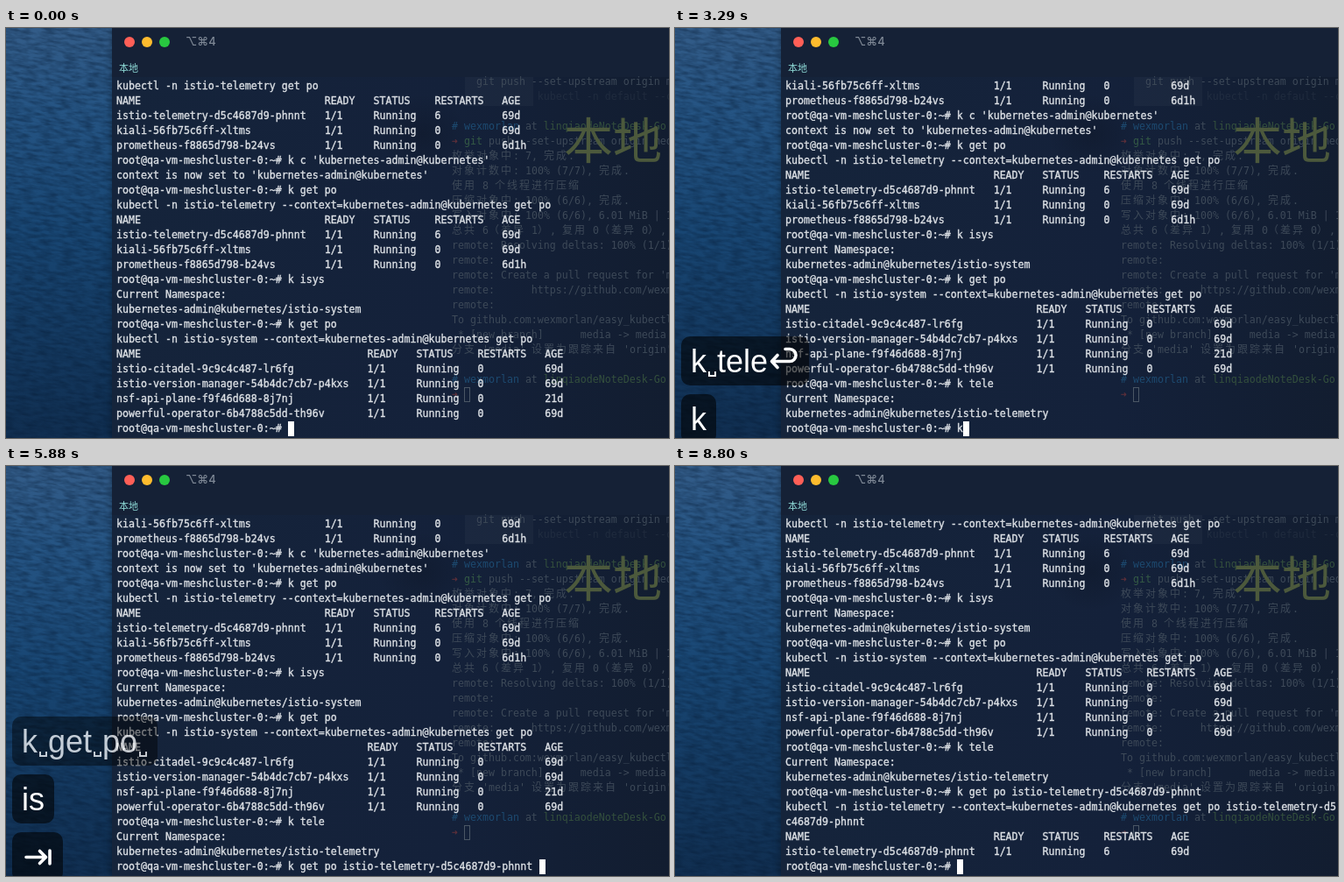
These frames come from a looping animation (757x468 px, 9760 ms). An HTML page:

```html
<!DOCTYPE html>
<html lang="en">
<head>
<meta charset="utf-8">
<title>Terminal session</title>
<style>
  html, body { margin: 0; width: 100%; height: 100%; overflow: hidden; background: #10304f; }
  #stage { position: relative; width: 757px; height: 468px; overflow: hidden; }
  #stage > *, #win > *, .key { position: absolute; }
  #win { left: 121px; top: 0; width: 636px; height: 468px; overflow: hidden;
    background: #152136; box-shadow: 0 0 8px rgba(0, 0, 0, .35); }
  #body { left: 0; top: 56px; width: 636px; height: 412px;
    background:
      radial-gradient(ellipse 50px 45px at 355px 65px, rgba(8, 13, 22, .25), transparent),
      linear-gradient(90deg, #15243b, #14213a 60%, #121d30); }
  .light { top: 10px; width: 12px; height: 12px; border-radius: 50%; }
  #title { left: 84px; top: 7px; color: #7f8996; font: 500 13px/17px Inter, "DejaVu Sans", sans-serif; }
  #tab { left: 8px; top: 37px; color: #8fdcd8; font: 11px/16px "Noto Sans CJK SC", "Noto Sans CJK", sans-serif; }
  #badge { left: 516px; top: 91px; color: #4c593c; white-space: nowrap;
    font: 500 56px/68px "Noto Sans CJK SC", "Noto Sans CJK", sans-serif; }
  #pane { left: 403px; top: 56px; width: 78px; height: 33px; background: rgba(255, 255, 255, .03); }
  #ghost, #term { margin: 0; white-space: pre;
    font: 11.627px/17px "DejaVu Sans Mono", "Noto Sans CJK SC", "Noto Sans CJK", monospace; }
  #ghost { left: 388px; top: 53px; color: #3d4958; }
  #ghost div { height: 17px; }
  #ghost i { font-style: normal; }
  .wide { font-size: 12px; letter-spacing: 2px; }
  .user { color: #1d4a70; } .host { color: #34503d; } .git { color: #345a45; }
  .mark { color: #5e303a; display: inline-block; width: 7px; }
  .faint { opacity: .3; }
  .box { display: inline-block; box-sizing: border-box; width: 7px; height: 17px;
    border: 1px solid #4a5664; vertical-align: top; }
  #term { left: 5px; top: 58px; color: #dde1e6; -webkit-text-stroke: .35px #dde1e6; }
  #cursor { top: 449px; width: 7px; height: 17px; background: #fff; }
  .key { left: 7px; height: 54px; padding: 2px 11px 0; border-radius: 10px; white-space: nowrap;
    background: rgba(0, 0, 0, .58); color: #fff;
    font: 36px/54px "Liberation Sans", Arial, sans-serif; }
  .key u { display: inline-block; box-sizing: border-box; width: 9px; height: 6px; margin: 0 1.5px;
    border: 2px solid #fff; border-top: 0; vertical-align: -5px; }
  .key svg { width: 36px; height: 54px; vertical-align: top; fill: none; stroke: #fff;
    stroke-width: 3.6; stroke-linecap: round; stroke-linejoin: round; }
</style>
</head>
<body>
<div id="stage">
  <svg width="757" height="468" style="left:0;top:0">
    <defs>
      <linearGradient id="sea" x2="0" y2="1">
        <stop offset="0" stop-color="#335c88"/>
        <stop offset=".2" stop-color="#255483"/>
        <stop offset=".5" stop-color="#184673"/>
        <stop offset="1" stop-color="#102e50"/>
      </linearGradient>
      <filter id="waves" x="0" y="0" width="1" height="1" color-interpolation-filters="sRGB">
        <feTurbulence type="fractalNoise" baseFrequency=".07 .28" numOctaves="3" seed="8"/>
        <feColorMatrix values="0 0 0 0 .02  0 0 0 0 .1  0 0 0 0 .2  .9 0 0 0 -.3"/>
      </filter>
    </defs>
    <rect width="130" height="468" fill="url(#sea)"/>
    <g transform="rotate(8)"><rect y="-30" width="220" height="520" filter="url(#waves)"/></g>
  </svg>
  <div id="win">
    <div id="body"></div>
    <div class="light" style="left:14px;background:#ff5f57"></div>
    <div class="light" style="left:34px;background:#febc2e"></div>
    <div class="light" style="left:54px;background:#28c840"></div>
    <div id="title">⌥⌘4</div>
    <div id="tab">本地</div>
    <div id="pane"></div>
    <div id="ghost"></div>
    <div id="badge">本地</div>
    <div id="term"></div>
    <div id="cursor"></div>
  </div>
  <div id="keys" style="left:0;top:0"></div>
</div>
<script>
const LOOP = 9760, ROWS = 24, CELL = 7;
const $ = id => document.getElementById(id);

// Dimmed window behind the terminal
const who = '<i class="user"># wexmorlan</i> at <i class="host">linqiaodeNoteDesk-Go</i>';
const ghost = [
  '    git push --set-upstream origin media',
  '<i class="faint">              kubectl -n default --context</i>', '',
  who,
  '<i class="mark">➜</i> <i class="git">git</i> push --set-upstream origin media',
  '枚举对象中: 7, 完成.',
  '对象计数中: 100% (7/7), 完成.',
  '使用 8 个线程进行压缩',
  '压缩对象中: 100% (6/6), 完成.',
  '写入对象中: 100% (6/6), 6.01 MiB | 1.20 MiB/s',
  '总共 6（差异 1）, 复用 0（差异 0）,',
  'remote: Resolving deltas: 100% (1/1)',
  'remote:',
  "remote: Create a pull request for 'media'",
  'remote:      https://github.com/wexmorlan',
  'remote:',
  'To github.com:wexmorlan/easy_kubectl',
  ' * [new branch]      media -> media',
  "分支 'media' 设置为跟踪来自 'origin'", '',
  who,
  '<i class="mark">➜</i> <i class="box"></i>'
];
$('ghost').innerHTML = ghost.map(s =>
  `<div>${s.replace(/[\u3000-\u9fff\uff00-\uffef]+/g, '<i class="wide">$&</i>')}</div>`).join('');

// Terminal scrollback
const prompt = 'root@qa-vm-meshcluster-0:~# ';
const ctx = 'kubernetes-admin@kubernetes';
const pod = 'istio-telemetry-d5c4687d9-phnnt';
const row = (w, name, ready, status, restarts, age) =>
  name.padEnd(w) + ready.padEnd(8) + status.padEnd(10) + restarts.padEnd(11) + age;
const head = w => row(w, 'NAME', 'READY', 'STATUS', 'RESTARTS', 'AGE');
const run = (w, name, restarts, age) => row(w, name, '1/1', 'Running', restarts, age);
const telemetry = [
  head(34), run(34, pod, '6', '69d'),
  run(34, 'kiali-56fb75c6ff-xltms', '0', '69d'),
  run(34, 'prometheus-f8865d798-b24vs', '0', '6d1h')
];
const getPo = `kubectl -n istio-telemetry --context=${ctx} get po`;
const long = `${getPo} ${pod}`;
const lines = [
  'kubectl -n istio-telemetry get po', ...telemetry,
  `${prompt}k c '${ctx}'`, `context is now set to '${ctx}'`,
  `${prompt}k get po`, getPo, ...telemetry,
  `${prompt}k isys`, 'Current Namespace:', `${ctx}/istio-system`,
  `${prompt}k get po`, `kubectl -n istio-system --context=${ctx} get po`,
  head(41),
  run(41, 'istio-citadel-9c9c4c487-lr6fg', '0', '69d'),
  run(41, 'istio-version-manager-54b4dc7cb7-p4kxs', '0', '69d'),
  run(41, 'nsf-api-plane-f9f46d688-8j7nj', '0', '21d'),
  run(41, 'powerful-operator-6b4788c5dd-th96v', '0', '69d'),
  `${prompt}k tele`, 'Current Namespace:', `${ctx}/istio-telemetry`,
  `${prompt}k get po ${pod}`, long.slice(0, 90), long.slice(90),
  head(34), run(34, pod, '6', '69d')
];

// [time, line holding the cursor]
const scroll = [[0, 23], [2520, 24], [2640, 26], [6600, 29], [6710, 31]];

// Key bubbles: text, time of each key, fade [start, end, steps]
const groups = [
  { text: 'k tele↩', at: [1740, 1860, 1980, 2100, 2160, 2280, 2460], fade: [4440, 4620, 4] },
  { text: 'k get po ', at: [3290, 3350, 3470, 3530, 3590, 3650, 3770, 3830, 3930], fade: [5880, 6060, 4] },
  { text: 'is', at: [4220, 4340], fade: [6360, 6540, 4] },
  { text: '⇥', at: [4920], fade: [6890, 7120, 5] },
  { text: '↩', at: [6600], fade: [8560, 8800, 4] }
];
const glyphs = {
  ' ': '<u></u>',
  '↩': '<svg viewBox="0 0 36 54"><path d="M11 19.5L4.500 26.500L11 33.500M5 26.500H25A7 7 0 0 0 25 12.500H20"/></svg>',
  '⇥': '<svg viewBox="0 0 36 54"><path d="M5 26.500H27M20.500 19.500L27.500 26.500L20.500 33.500M32 19V34"/></svg>'
};
for (const g of groups) {
  g.el = document.createElement('div');
  g.el.className = 'key';
  $('keys').append(g.el);
}

const pressed = (g, t) => g.at.filter(a => a <= t).length;
const typed = (g, t) => g.text.slice(0, pressed(g, t));

function inputLine(line, t) {
  if (line === 23) return prompt + typed(groups[0], t).replace('↩', '');
  if (line === 26) return prompt + typed(groups[1], t) + (t < 5100 ? typed(groups[2], t) : pod + ' ');
  return line === 31 ? prompt : '';
}

function opacity([start, end, n], t) {
  if (t < start) return 1;
  if (t >= end) return 0;
  return 1 - (Math.floor((t - start) * (n - 1) / (end - start)) + 1) / n;
}

let shown = '';
function drawTerm(t) {
  const line = scroll.filter(s => s[0] <= t).pop()[1];
  const input = inputLine(line, t);
  const text = [...lines.slice(line - ROWS + 1, line), input].join('\n');
  if (text === shown) return;
  shown = text;
  $('term').textContent = text;
  $('cursor').style.left = 5 + input.length * CELL + 'px';
}

function drawKeys(t) {
  groups.forEach((g, i) => {
    const n = pressed(g, t), alpha = n ? opacity(g.fade, t) : 0;
    const newer = groups.slice(i + 1).filter(o => o.at[0] <= t).length;
    if (n !== g.n) {
      g.n = n;
      g.el.innerHTML = [...g.text.slice(0, n)].map(c => glyphs[c] || c).join('');
    }
    g.el.style.display = alpha ? 'block' : 'none';
    g.el.style.opacity = alpha;
    g.el.style.top = 418 - 66 * newer + 'px';
  });
}

function tick() {
  const t = performance.now() % LOOP;
  drawTerm(t);
  drawKeys(t);
  requestAnimationFrame(tick);
}
tick();
</script>
</body>
</html>
```
